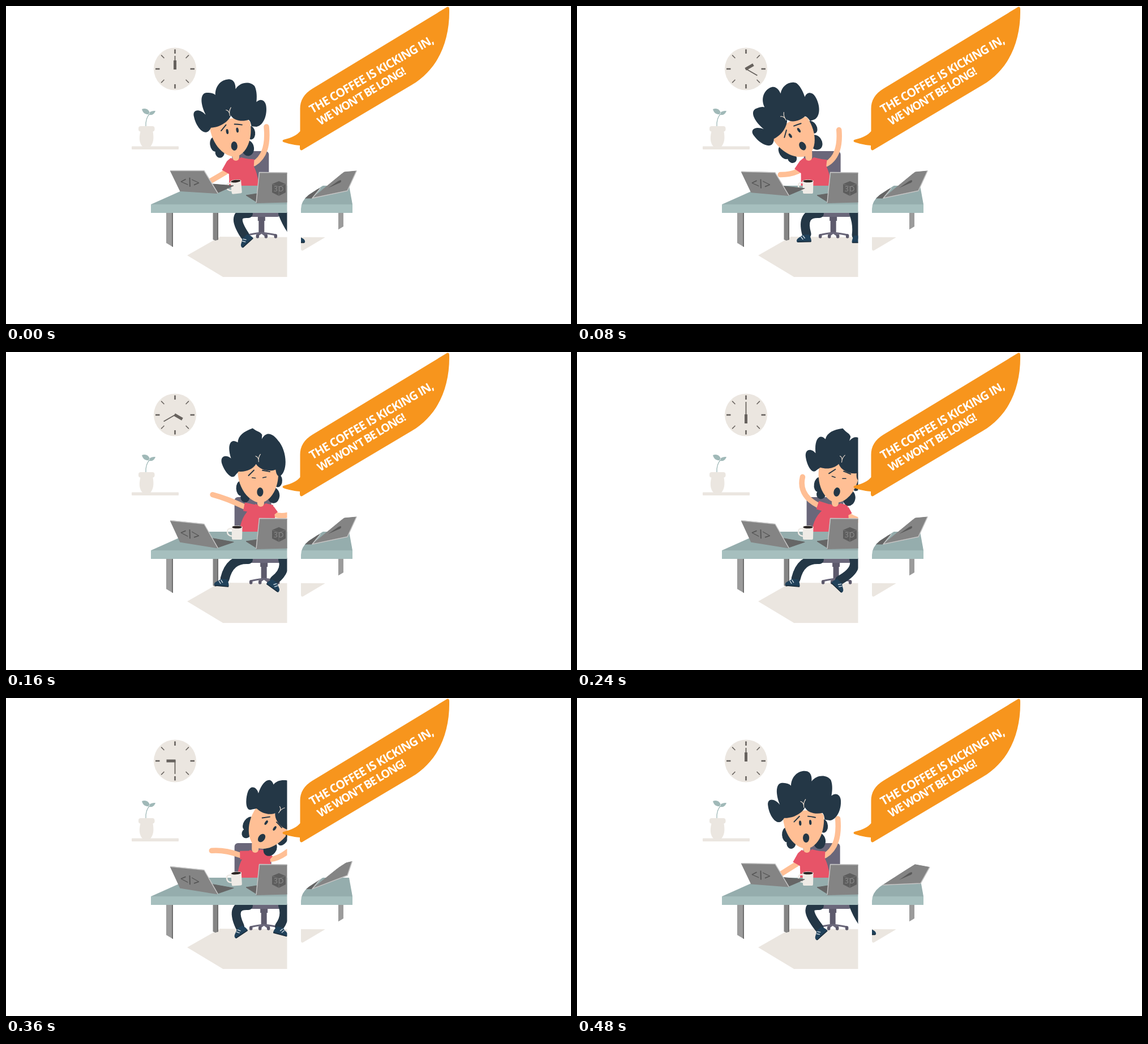
These frames come from a looping animation (998 px wide and 561 px high, 0.52 s). An HTML page:

```html
<!DOCTYPE html>
<html lang="en">
<head>
<meta charset="utf-8">
<title>Coffee break</title>
<style>
  html, body { margin: 0; width: 100%; height: 100%; overflow: hidden; background: #fff; }
  svg { display: block; width: 100%; height: 100%; }
  .say { font: 700 21px "Open Sans", "Noto Sans", sans-serif; fill: #fff; }
  .mark { font: 400 23px "Open Sans", "Noto Sans", sans-serif; fill: #555; text-anchor: middle; }
  .line { fill: none; stroke-linecap: round; stroke-linejoin: round; }
  .pale { fill: #ebe6e0; }
  .hair { fill: #243746; }
  .lid { fill: #848484; stroke: #848484; stroke-width: 2; stroke-linejoin: round; }
  .base { fill: #666; stroke: #666; stroke-linejoin: round; }
  .edge { stroke: #c6c6c6; stroke-width: 1.5; }
  .skin { stroke: #ffbf95; stroke-width: 9.5; }
  .sleeve { stroke: #e75468; stroke-width: 15; fill: none; }
  .leg { stroke: #243746; stroke-width: 16; }
</style>
</head>
<body>
<svg viewBox="0 0 998 561" preserveAspectRatio="none">
  <defs>
    <clipPath id="panes">
      <path d="M0 0H496.5V478H383L283 418L0 248Z"/>
      <path d="M521 428V358Q521 344 535 333L640 265V363L525 431Q521 433 521 428Z"/>
    </clipPath>
    <g id="shoe">
      <path fill="#20415a" d="M-13 4C-13-2-6-2-2-7L9-7Q13-1 13 5L-11 6Q-13 6-13 4Z"/>
      <path class="line" stroke="#1b2c3a" stroke-width="1.6" d="M-11 5.4H12"/>
      <path class="line" stroke="#c3d0da" stroke-width="1.5" d="M-5-3L-2 1M-1.5-5L1.5-1"/>
    </g>
  </defs>

  <!-- wall -->
  <circle class="pale" cx="298.5" cy="111" r="37.5"/>
  <g id="ticks" stroke="#67625e"></g>
  <path id="hour" stroke="#67625e" stroke-width="5" d="M298.5 112V96"/>
  <path id="minute" stroke="#67625e" stroke-width="1.8" d="M298.5 112V88"/>
  <rect class="pale" x="222" y="247.5" width="83" height="5.5" rx="1"/>
  <path class="line" stroke="#a0b9b8" stroke-width="1.3" d="M247 213Q246 198 254 190"/>
  <path fill="#a0b9b8" d="M254 191C254 183 247 179 240 182C242 190 248 192 254 191ZM252 191C253 186 258 185 264 185C262 191 257 194 252 191Z"/>
  <rect class="pale" x="234" y="212" width="28.5" height="9.5" rx="4"/>
  <path class="pale" d="M238 219H259C262 234 260 242 255 248H241C236 242 234 234 238 219Z"/>

  <g clip-path="url(#panes)">
    <path class="pale" d="M320 440L378 407L563 408L600 478H383Z"/>
    <path fill="#858585" d="M365.5 360H375V412L370 414L365.5 412Z"/>
    <path fill="#707070" d="M373 360H375V412L373 413Z"/>
    <path fill="#9b9b9b" d="M283 360H295V430H283ZM587 360H596V400H587Z"/>
    <path fill="#6e6e6e" d="M293 360H295V430H293Z"/>

    <g id="chair">
      <rect x="399" y="256" width="65" height="80" rx="6" fill="#6a677a"/>
      <path fill="#6a677a" d="M420 360H485V367Q484 372 478 372H427Q421 372 420 367Z"/>
      <path fill="#5d5a6c" d="M444.5 372H457.5V379H456V400H446V379H444.5Z"/>
      <path class="line" stroke="#6a677a" stroke-width="3" d="M428 404Q434 402 451 400Q468 402 476 404M451 400L444 405M451 400L458 405"/>
      <path class="line" stroke="#5d5a6c" stroke-width="5.5" d="M428 405V407M444 405V407M459 405V407M476 405V407"/>
    </g>
    <path id="legR" class="line leg"/>
    <use id="shoeR" href="#shoe"/>
    <path id="legL" class="line leg"/>
    <use id="shoeL" href="#shoe"/>

    <path id="armL" class="line skin"/>
    <path id="armR" class="line skin"/>
    <path id="sleeveL" class="sleeve"/>
    <path id="sleeveR" class="sleeve"/>
    <path id="torso" fill="#e75468"/>
    <path id="neck" class="line skin" style="stroke-width:12"/>

    <g id="head">
      <g class="hair">
        <ellipse cx="-34" cy="-8" rx="8" ry="13"/>
        <ellipse cx="-27" cy="8" rx="8" ry="9"/>
        <ellipse cx="32" cy="-19" rx="8" ry="12"/>
        <ellipse cx="23" cy="7" rx="11" ry="14"/>
      </g>
      <path fill="#ffbf95" d="M-38-36C-38-52 33-54 34-36C34-8 20 17 0 19C-20 17-37-6-38-36Z"/>
      <g id="curls">
        <path id="front" class="hair" d="M-36-38C-48-20-62-42-63-62C-64-76-50-74-42-62C-50-88-44-102-34-100C-27-99-22-97-20-94C-18-110-6-119 6-118C18-117 18-106 17-99C26-110 44-110 51-99C54-90 52-78 50-71C58-77 66-72 66-62C66-45 56-28 44-28L35-30C35-36 34-40 32-42C20-40 6-44 2-54C-4-44-20-36-36-38Z"/>
        <path id="turned" class="hair" d="M-44-32C-52-20-66-42-69-56C-71-70-58-70-51-63C-58-88-50-102-37-92C-36-104-25-112-8-117C0-110 6-110 9-104L8-96C18-112 30-104 38-92C50-78 54-50 46-34C40-22 32-22 31-38C20-34 2-38-5-50C-12-40-26-36-38-38Z"/>
        <path class="line" stroke="#f4e4d6" stroke-width="1.1" d="M-5-65Q1-63 0-54M4-68Q0-63 0-57"/>
      </g>
      <g class="line" stroke="#243746" stroke-width="1.9">
        <path d="M-19-30L-9-39M6-38Q12-37 19-35"/>
        <path id="shut" stroke-width="1.5" d="M-13-26L-7-25M6-25L12-26"/>
      </g>
      <g id="open" fill="#243746">
        <ellipse cx="-8.5" cy="-27" rx="2.2" ry="4.5"/>
        <ellipse cx="9.5" cy="-27" rx="2.2" ry="4.5"/>
      </g>
      <ellipse rx="5.6" ry="8" fill="#243746" transform="rotate(4)"/>
    </g>

    <path fill="#95adad" d="M256 350L330 317H606L612 350Z"/>
    <path fill="#a6bfbe" d="M256 350H612V365H256Z"/>

    <g id="mug">
      <path class="line" stroke="#efebe6" stroke-width="2.5" d="M400 312Q391 310 391 317Q391 324 400 325"/>
      <path fill="#efebe6" d="M398.5 308H417.5L417 329Q417 331 415 331H401Q399 331 399 329Z"/>
      <ellipse cx="408" cy="309" rx="9.5" ry="3" fill="#efebe6"/>
      <ellipse cx="408" cy="309" rx="8.5" ry="2.3" fill="#2b2624"/>
    </g>

    <g id="laptop">
      <path class="base" d="M373 330L402 317L364 314Z"/>
      <path class="lid" d="M291 291H349L373 330L308 326Z"/>
      <path class="line edge" d="M291 290.5H350L374 330"/>
      <text class="mark" transform="matrix(1 .06 .4 1 328 319)">&lt;/&gt;</text>
    </g>

    <path class="base" d="M424 334L443 331V346Z"/>
    <path class="lid" d="M448 294L512 295V345L442.5 347Z"/>
    <path class="line edge" d="M512 294L447.5 293.5L442 346.5"/>
    <path fill="#5d5d5d" d="M470 314L482 309L494 314V329L482 335L470 329Z"/>
    <path class="line" stroke="#777" d="M470 314L482 319L494 314M482 319V335"/>
    <text class="mark" x="482" y="327" style="font-size:13px;fill:#8d8d8d;letter-spacing:1px">3D</text>

    <path id="keyboard" class="base" d="M526 339L540 339L554 322L538 327Z"/>
    <path id="lid" class="lid" style="stroke-width:1"/>
    <path id="rim" class="line edge"/>
    <path id="pen" fill="#5a5a5a" d="M569 321L585 310Q591 306 592 308Q593 311 587 313Z"/>
  </g>

  <path fill="#f7951d" d="M783 6Q783-1 777 3L541 146Q519.5 159 519.5 181V221C513 229 502 233 490 236Q487 238 490 240Q504 245 519 246V251Q520 257 525 253L717 139C761 113 784 65 783 6Z"/>
  <text class="say" transform="translate(541 190) rotate(-30.2)" letter-spacing="-1">THE COFFEE IS KICKING IN,</text>
  <text class="say" transform="translate(555 211) rotate(-31)" letter-spacing="-1.5" style="font-size:20px">WE WON'T BE LONG!</text>
</svg>

<script>
const STEP = 40, STEPS = 13, TURN = 2 * Math.PI;
const $ = id => document.getElementById(id);
const set = (id, name, value) => $(id).setAttribute(name, value);
const show = (id, on) => set(id, "visibility", on ? "visible" : "hidden");
const mix = (a, b, k) => a + (b - a) * k;
const blend = (a, b, k) => a.map((v, i) => mix(v, b[i], k));
const ease = (from, to, v) => {
  const k = Math.min(1, Math.max(0, (v - from) / (to - from)));
  return k * k * (3 - 2 * k);
};
// One swing per loop, highest at step `peak`.
const wave = (n, peak) => Math.cos((n - peak) / STEPS * TURN);

function leg(side, dir, hip, knee, x, y, turn) {
  const a = turn * Math.PI / 180;
  const ax = x + 5 * dir * Math.cos(a) + 8 * Math.sin(a);
  const ay = y + 5 * dir * Math.sin(a) - 8 * Math.cos(a);
  set("leg" + side, "d", `M${hip} 366Q${knee} ${ax} ${ay}`);
  set("shoe" + side, "transform", `translate(${x} ${y}) rotate(${turn}) scale(${dir} 1)`);
}

function arm(side, root, [sx, sy, bx, by, hx, hy]) {
  set("arm" + side, "d", `M${sx} ${sy}Q${bx} ${by} ${hx} ${hy}`);
  set("sleeve" + side, "d", `M${root} 277L${sx} ${sy}`);
}

function drawBody(n, lean) {
  const neck = mix(406, 456, lean), left = mix(394, 415, lean), right = mix(447, 482, lean);
  set("chair", "transform", `translate(${3.5 + 3.2 * wave(n, 6.5)} 0)`);
  set("neck", "d", `M${neck} 258V267`);
  set("torso", "d", `M${neck - 9} 268Q${neck} 274 ${neck + 9} 267L${neck + 22} 270Q${right - 3} 284 ${right} 320H${left}Q${left + 1} 290 ${neck - 15} 273Z`);

  const stepL = wave(n, 5), xL = 404 - 26 * stepL;
  leg("L", 1, 428, "395 364", xL, 411 - 4 * stepL, 5 - 47 * ease(395, 420, xL));
  const xR = 489 - 27 * wave(n, 6);
  leg("R", -1, 489, "496 385", xR, 412, 43 * ease(500, 464, xR));

  const tilt = 2 + 27 * wave(n, 8.2) + 8 * wave(3 * n, 0);
  const flap = Math.cos((n - 6.2) / 5 * TURN);
  const reach = 28 * Math.max(0, wave(n, 8.8));
  arm("L", neck - 9, blend(
    [neck - 18, 293, 375, 301, 357, 314 + .35 * tilt],
    [neck - 31, 270, 391, 252, 382 + 17 * flap, 232 - 12 * flap], lean));
  arm("R", neck + 17, blend(
    [neck + 32, 278, 465, 262, 460 + reach, 213],
    [neck + 23, 288, 488, 294, 502, 298], lean));

  const away = lean > .5, blink = away && n < 8;
  set("head", "transform", `translate(${neck + tilt / 3} 247) rotate(${tilt})`);
  set("curls", "transform", `translate(0 -40) scale(${1 - .06 * lean}) translate(0 40)`);
  show("turned", away);
  show("front", !away);
  show("shut", blink);
  show("open", !blink);
}

function drawDesk(n) {
  const sag = ease(1, 4, n) * (1 - ease(10.3, 12.6, n));
  set("laptop", "transform", `matrix(1 ${.1 * sag} 0 1 0 ${-22 * sag})`);
  set("mug", "transform", `rotate(${-6 * Math.max(0, Math.cos(n / 8 * TURN))} 408 331)`);

  // The right lid folds thin, then opens flatter.
  const fold = ease(7.5, 10, n) * (1 - ease(10, 12.5, n));
  const flat = ease(10, 12, n), rise = 9 * ease(8, 11, n);
  const hinge = `${541 - 4 * flat} ${339 - rise}`;
  const top = `${619 - 12 * fold + 5 * flat} ${291 - 4 * fold + 8 * flat}`;
  const low = `${603 + 4 * flat} ${326 - 20 * fold + 3 * flat}`;
  set("lid", "d", `M${hinge}L597 ${293 - 2 * fold + flat}L${top}L${low}Z`);
  set("rim", "d", `M${low}L${hinge}l14 -17M${top}L${low}`);
  set("keyboard", "transform", `translate(0 ${-rise})`);
  show("keyboard", flat < 1);
  show("pen", fold < .5);
}

function draw(n) {
  set("hour", "transform", `rotate(${30 * n} 298.5 111)`);
  set("minute", "transform", `rotate(${60 * n} 298.5 111)`);
  drawBody(n, ease(1.5, 4.7, n) * (1 - ease(7.8, 11, n)));
  drawDesk(n);
}

for (let i = 0; i < 8; i++) {
  const tick = document.createElementNS("http://www.w3.org/2000/svg", "path");
  tick.setAttribute("d", "M0-34.5V-27");
  tick.setAttribute("stroke-width", i % 2 ? 1.5 : 2.6);
  tick.setAttribute("transform", `translate(298.5 111) rotate(${45 * i})`);
  $("ticks").append(tick);
}

let start, last = -1;
function loop(now) {
  start ??= now;
  const n = Math.floor((now - start) / STEP) % STEPS;
  if (n !== last) draw(last = n);
  requestAnimationFrame(loop);
}
draw(0);
requestAnimationFrame(loop);
</script>
</body>
</html>
```
